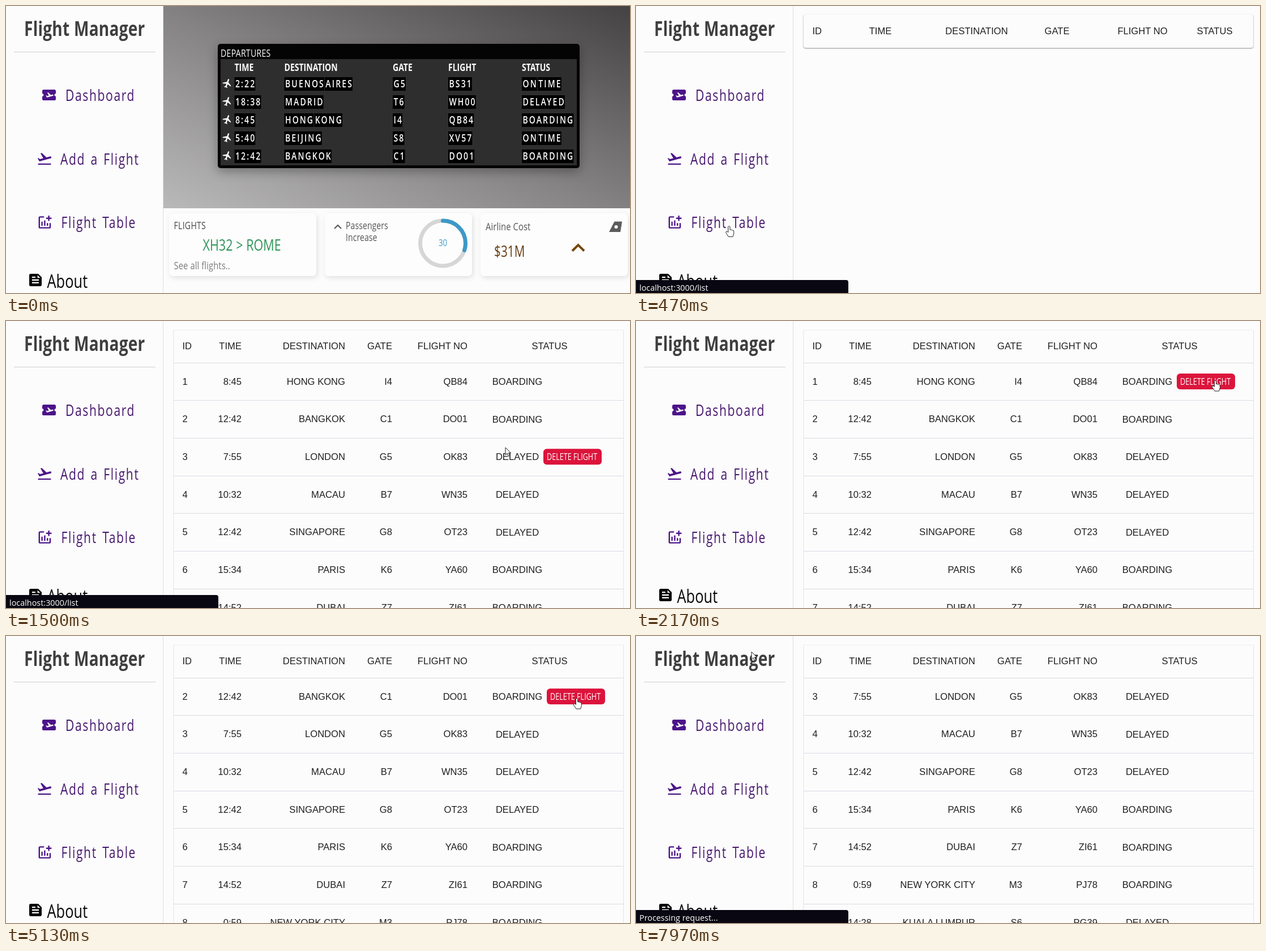
These frames come from a looping animation (1102x508 px, 8 s). An HTML page:

```html
<!DOCTYPE html>
<html lang="en">
<head>
<meta charset="utf-8">
<title>Flight Manager</title>
<style>
  html, body { margin: 0; width: 100%; height: 100%; overflow: hidden; background: #fcfcfc; }
  svg { display: block; position: absolute; left: 0; top: 0; }
  text { white-space: pre; }
  .narrow { font-family: "Open Sans", "Noto Sans", sans-serif; }
  .cell { font: 16.6px "Liberation Sans", Arial, sans-serif; fill: #1f1f1f; }
  .tip { font: 14.4px "Open Sans", "Noto Sans", sans-serif; fill: #fff; }
  .card { fill: #fdfdfd; filter: drop-shadow(2px 3px 4px rgba(0, 0, 0, .11)); }
</style>
</head>
<body>
<svg id="stage" width="1102" height="508" viewBox="0 0 1102 508">
  <defs>
    <linearGradient id="wall" x1="0" y1="1" x2="1" y2="0">
      <stop offset="0" stop-color="#bab9b9"/>
      <stop offset=".48" stop-color="#858383"/>
      <stop offset="1" stop-color="#454243"/>
    </linearGradient>
  </defs>
  <g id="side"></g>
  <g id="dash"></g>
  <g id="list"></g>
  <g id="bubble">
    <path d="M0 485H371q4 0 4 4V508H0z" fill="#090812"/>
    <text id="tip" class="tip" x="6" y="504"></text>
  </g>
  <g id="cursor" stroke="#222" stroke-width="1" stroke-linejoin="round" fill="#fff">
    <path id="arrow" d="M0 0V13.2L3.1 10.4 5.3 15.4 7.6 14.4 5.4 9.6H9.6z"/>
    <path id="hand" d="M-1.6 1.2Q0-1 1.6 1.2V6.6Q3 5.7 4 7.1 5.4 6.4 6.2 7.8 8.4 7.4 8.4 9.8V13.4L6.6 19H-1L-5.4 12.2Q-6 9.4-4.2 9.6-2.8 9.8-1.6 11.4z"/>
  </g>
</svg>
<script>
const LOOP = 8000, CONDENSE = 0.78;
const $ = id => document.getElementById(id);
const side = $('side'), dash = $('dash'), list = $('list');

function add(parent, tag, attrs, content) {
  const el = document.createElementNS('http://www.w3.org/2000/svg', tag);
  for (const k in attrs) el.setAttribute(k, attrs[k]);
  if (content !== undefined) el.textContent = content;
  parent.appendChild(el);
  return el;
}

const rect = (p, x, y, width, height, fill, rx = 0) =>
  add(p, 'rect', { x, y, width, height, fill, rx });

// One condensed face shared by every label.
function label(p, x, y, str, size, fill, opts = {}) {
  return add(p, 'text', {
    class: 'narrow', transform: `translate(${x} ${y}) scale(${CONDENSE} 1)`,
    'font-size': size, 'font-weight': 500, fill, 'letter-spacing': 0.1, ...opts
  }, str);
}

const cell = (p, x, y, str, anchor = 'end') =>
  add(p, 'text', { class: 'cell', x, y, 'text-anchor': anchor }, str);

// Icons use a 24-unit grid centred on x, y.
const icon = (p, d, x, y, scale, fill, turn = 0) =>
  add(p, 'path', { d, fill, transform: `translate(${x} ${y}) rotate(${turn}) scale(${scale}) translate(-12 -12)` });

const ICON = {
  ticket: 'M20.19 4H4c-1.1 0-1.99.9-1.99 2v4c1.1 0 1.99.9 1.99 2s-.89 2-2 2v4c0 1.1.9 2 2 2h16c1.1 0 2-.9 2-2v-4c-1.1 0-2-.9-2-2s.9-2 2-2V6c0-1.1-.84-2-1.81-2zm-2.46 9.3-8.86 2.36-1.66-2.88.93-.25 1.26.99 2.39-.64-2.4-4.16 1.4-.38 4.01 3.74 2.44-.65c.51-.14 1.04.17 1.18.68.13.51-.17 1.04-.69 1.19z',
  takeoff: 'M2.5 19h19v2h-19v-2zm19.57-9.36c-.21-.8-1.04-1.28-1.84-1.06L14.92 10l-6.9-6.43-1.93.51 4.14 7.17-4.97 1.33-1.97-1.54-1.45.39 2.59 4.49s7.12-1.9 16.57-4.43c.81-.23 1.28-1.05 1.07-1.85z',
  chart: 'M22 5v2h-3v3h-2V7h-3V5h3V2h2v3h3zm-3 14H5V5h6V3H5c-1.1 0-2 .9-2 2v14c0 1.1.9 2 2 2h14c1.1 0 2-.9 2-2v-6h-2v6zm-4-6v4h2v-4h-2zm-4 4h2V9h-2v8zm-2 0v-6H7v6h2z',
  feed: 'M16 3H5c-1.1 0-2 .9-2 2v14c0 1.1.9 2 2 2h14c1.1 0 2-.9 2-2V8l-5-5zM7 7h5v2H7V7zm10 10H7v-2h10v2zm0-4H7v-2h10v2zm-2-4V5l4 4h-4z',
  plane: 'M21 16v-2l-8-5V3.5c0-.83-.67-1.5-1.5-1.5S10 2.67 10 3.5V9l-8 5v2l8-2.5V19l-2 1.5V22l3.5-1 3.5 1v-1.5L13 19v-5.5l8 2.5z'
};

function buildSide() {
  const purple = '#4c1489';
  rect(side, 277, 0, 1, 508, '#dedee2');
  rect(side, 14, 81, 250, 1, '#cfcfca');
  label(side, 32, 53, 'Flight Manager', 36, '#3f3f3f', { 'font-weight': 700, 'letter-spacing': 0.3 });
  [['Dashboard', 105, 168], ['Add a Flight', 96, 281], ['Flight Table', 97.5, 393]].forEach(([s, x, y]) =>
    label(side, x, y, s, 27, '#47186f', { 'letter-spacing': 2.1, 'word-spacing': 3 }));
  icon(side, ICON.ticket, 76, 157.5, 1.2, purple);
  icon(side, ICON.takeoff, 68, 270.3, 1.2, purple);
  icon(side, ICON.chart, 68.4, 383, 1.2, purple);
  icon(side, ICON.feed, 52, 485, 1.22, '#000');
  label(side, 72.5, 499, 'About', 32.5, '#080808');
}

// Each word sits on its own black plate.
function plates(x, y, str) {
  str.split(' ').forEach(word => {
    const plate = rect(dash, x, y - 17.5, 0, 24, '#000');
    const t = label(dash, x + 1.5, y, word, 18, '#fff', { 'font-weight': 600, 'letter-spacing': 2.7 });
    const w = t.getComputedTextLength() * CONDENSE + 0.5;
    plate.setAttribute('width', w);
    x += w + 1;
  });
}

function buildDash() {
  rect(dash, 278, 0, 824, 358, 'url(#wall)');
  rect(dash, 374, 67, 639, 220, '#040404', 5).style.filter = 'drop-shadow(0 6px 9px rgba(0,0,0,.3))';
  rect(dash, 379, 94, 629, 188, '#2e2e2e');
  label(dash, 379, 90, 'DEPARTURES', 18, '#fff', { 'letter-spacing': 0.4 });
  const cols = [403.5, 491.5, 683, 781, 911];
  ['TIME', 'DESTINATION', 'GATE', 'FLIGHT', 'STATUS'].forEach((s, i) =>
    label(dash, cols[i], 115, s, 18, '#fff', { 'font-weight': 700, 'letter-spacing': 0 }));
  [
    '2:22|BUENOS AIRES|G5|BS31|ON TIME',
    '18:38|MADRID|T6|WH00|DELAYED',
    '8:45|HONG KONG|I4|QB84|BOARDING',
    '5:40|BEIJING|S8|XV57|ON TIME',
    '12:42|BANGKOK|C1|DO01|BOARDING'
  ].forEach((row, r) => {
    const y = 143.5 + 32 * r;
    icon(dash, ICON.plane, 391, y - 6.5, 0.8, '#fff', 20);
    row.split('|').forEach((s, i) => plates(cols[i], y, s));
  });

  [288, 563, 838].forEach(x => rect(dash, x, 367, 260, 111, '#fdfdfd', 7).setAttribute('class', 'card'));
  label(dash, 296.5, 394.5, 'FLIGHTS', 18, '#484848', { 'letter-spacing': 0.4 });
  label(dash, 347.5, 433, 'XH32 > ROME', 27.5, '#2f9459');
  label(dash, 296.5, 465.5, 'See all flights..', 19, '#7b7b7b');
  label(dash, 600, 395, 'Passengers', 18, '#555');
  label(dash, 600, 416, 'Increase', 18, '#555');
  label(dash, 847, 397, 'Airline Cost', 19, '#555');
  label(dash, 862, 443.5, '$31M', 26.5, '#653c12');

  const line = (d, stroke, w) => add(dash, 'path', { d, stroke, 'stroke-width': w, fill: 'none' });
  line('M580 394L586 388 592 394', '#555', 2);
  line('M1000 433.5L1010.5 423 1021 433.5', '#764607', 4);
  const ring = { cx: 771.5, cy: 420, r: 40, fill: 'none', 'stroke-width': 7 };
  add(dash, 'circle', { ...ring, stroke: '#d6d6d6' });
  add(dash, 'circle', {
    ...ring, stroke: '#3e98c7', pathLength: 100, 'stroke-dasharray': '30 100',
    'stroke-linecap': 'round', transform: 'rotate(-90 771.5 420)'
  });
  label(dash, 771.5, 425, '30', 17, '#3e98c7', { 'text-anchor': 'middle', 'letter-spacing': 0 });
  add(dash, 'path', { d: 'M1065 400L1074.5 381.5H1088L1085 400z', fill: '#5c5c5c' });
  add(dash, 'circle', { cx: 1077.5, cy: 391, r: 3, fill: '#fff' });
}

const ROW_H = 66.67, TOP = 74;
const FLIGHTS = [
  '8:45|HONG KONG|I4|QB84|BOARDING',
  '12:42|BANGKOK|C1|DO01|BOARDING',
  '7:55|LONDON|G5|OK83|DELAYED',
  '10:32|MACAU|B7|WN35|DELAYED',
  '12:42|SINGAPORE|G8|OT23|DELAYED',
  '15:34|PARIS|K6|YA60|BOARDING',
  '14:52|DUBAI|Z7|ZI61|BOARDING',
  '0:59|NEW YORK CITY|M3|PJ78|BOARDING',
  '14:28|KUALA LUMPUR|S6|PG39|DELAYED'
].map(s => s.split('|'));
const HEADS = ['TIME', 'DESTINATION', 'GATE', 'FLIGHT NO', 'STATUS'];
const ENDS = [416, 599, 682, 815];

let empty, full, rows, button;
function buildList() {
  empty = add(list, 'g', {});
  rect(empty, 296, 15, 794, 59, '#fcfcfc', 4).style.filter = 'drop-shadow(0 1px 1px rgba(0,0,0,.45))';
  cell(empty, 311.5, 49.5, 'ID', 'start');
  [431.5, 601.5, 743.5, 894.5, 1022].forEach((x, i) => cell(empty, x, 49.5, HEADS[i], 'middle'));

  full = add(list, 'g', {});
  rect(full, 295.5, 16, 1, 492, '#e4e4e8');
  rect(full, 1090, 16, 1, 492, '#e4e4e8');
  rect(full, 296, 15.5, 794, 1, '#f0f0f2');
  for (let i = 0; i < 7; i++) rect(full, 296, Math.round(TOP - 0.4 + ROW_H * i), 794, 1, '#d9d9e6');
  cell(full, 311.5, 49.5, 'ID', 'start');
  HEADS.forEach((s, i) => i < 4 ? cell(full, ENDS[i], 49.5, s) : cell(full, 960, 49.5, s, 'middle'));
  rows = FLIGHTS.map((f, n) => {
    const g = add(full, 'g', {});
    cell(g, 311.5, 112.5, n + 1, 'start');
    ENDS.forEach((x, i) => cell(g, x, 112.5, f[i]));
    cell(g, 903, 113, f[4], 'middle');
    return g;
  });
  button = add(full, 'g', {});
  rect(button, 0, 93, 103, 28, '#dc143c', 6);
  label(button, 6, 113, 'DELETE FLIGHT', 16.2, '#fff', { 'letter-spacing': 0 });
}

// Pointer: time, x, y of the hot spot.
const PATH = [
  [30, -12, 330], [300, 164, 389], [780, 165, 390], [870, 190, 396], [1030, 400, 405],
  [1350, 790, 290], [1670, 985, 150], [1950, 1042, 112], [2170, 1023, 105], [3000, 1023, 105],
  [3330, 1057, 133], [3770, 1070, 132], [3830, 1068, 131], [4130, 1040, 126], [5000, 1040, 126],
  [5130, 1008, 110], [6570, 1008, 110], [6900, 640, 60], [7270, 130, -18],
  [7900, 124, -18], [7930, 128, 1], [7970, 204, 28]
];

function pointer(t) {
  if (t <= PATH[0][0]) return PATH[0].slice(1);
  const i = PATH.findIndex(p => p[0] > t);
  if (i < 0) return PATH[PATH.length - 1].slice(1);
  const a = PATH[i - 1], b = PATH[i], k = (t - a[0]) / (b[0] - a[0]);
  return [a[1] + (b[1] - a[1]) * k, a[2] + (b[2] - a[2]) * k];
}

const show = (el, on) => { el.style.display = on ? '' : 'none'; };

function draw(t) {
  const [x, y] = pointer(t);
  const onList = t >= 430, loaded = t >= 600;
  const gone = t >= 5870 ? 2 : t >= 2670 ? 1 : 0;
  show(dash, !onList);
  show(list, onList);
  show(empty, !loaded);
  show(full, loaded);
  rows.forEach((g, i) => {
    show(g, i >= gone);
    g.setAttribute('transform', `translate(0 ${ROW_H * (i - gone)})`);
  });

  const slot = Math.floor((y - TOP) / ROW_H);
  const hover = loaded && x > 296 && x < 1090 && slot >= 0;
  const flight = hover && FLIGHTS[slot + gone];
  const left = flight && flight[4] === 'DELAYED' ? 949 : 955;
  const lift = Math.max(slot, 0) * ROW_H;
  show(button, flight);
  button.setAttribute('transform', `translate(${left} ${lift})`);

  const onButton = flight && x > left && x < left + 103 && y > 93 + lift && y < 121 + lift;
  const onLink = x > 56 && x < 236 && y > 368 && y < 400;
  show($('hand'), onButton || onLink);
  show($('arrow'), !(onButton || onLink));
  $('cursor').setAttribute('transform', `translate(${x} ${y})`);

  const busy = t >= 7600;
  $('tip').textContent = busy ? 'Processing request...' : 'localhost:3000/list';
  const fade = Math.min(1, Math.max(0, (1850 - t) / 150));
  $('bubble').style.opacity = busy ? 1 : t < 270 ? 0 : fade;
}

buildSide();
buildDash();
buildList();
const start = performance.now();
function tick() {
  draw((performance.now() - start) % LOOP);
  requestAnimationFrame(tick);
}
tick();
</script>
</body>
</html>
```
